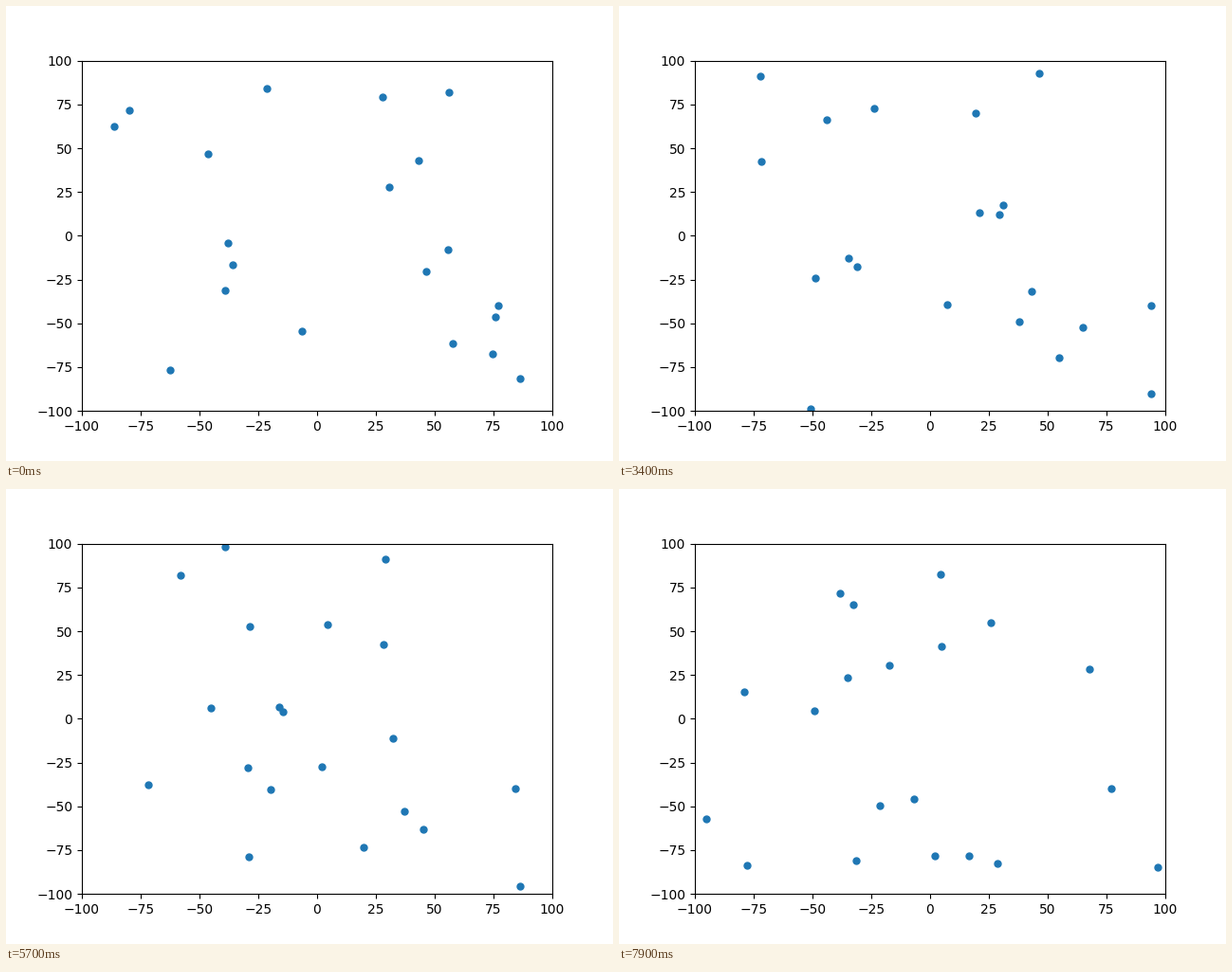
Recreate the animation shown at these times as a matplotlib script. Size 640 px wide and 480 px high, loop 8000 ms.

```python
from itertools import combinations

import numpy as np
import matplotlib.pyplot as plt
from matplotlib.animation import FuncAnimation

FRAMES, INTERVAL = 80, 100      # ms per frame
SUBSTEPS = 10
WALL = 100
CONTACT = 2.95                  # distance at which two balls collide
CENTER = np.array([328, 242.4])         # stage pixel of the data origin
SCALE = np.array([2.48, -1.848])        # stage pixels per data unit

# Every ball starts at rest: start x, y (px), constant pull x, y (px/s^2)
BALLS = np.array([
    (114, 127, 6.3, 6.4), (130, 110, 3.3, -6.3),
    (275, 87, -1.1, 3.6), (397, 96, -3.6, 2.9),
    (467, 91, -4.1, -3.4), (213, 156, 1.1, -6.3),
    (435, 163, -9.6, 9.5), (404, 191, 0.2, 4.2),
    (234, 250, 1.3, 2.7), (239, 273, -5.5, 2.4),
    (231, 300, 3.5, -4.3), (466, 257, -11.3, -7.2),
    (443, 280, -1.4, 3.7), (519, 316, 7.3, 0),
    (516, 328, -4.7, 1.9), (471, 356, -8.5, -3.9),
    (513, 367, -8.4, 0.7), (542, 393, 9.1, 2.7),
    (312, 343, 5.9, -4.9), (173, 384, 5.1, 7.8),
])
PAIRS = np.array(list(combinations(range(len(BALLS)), 2)))


def collide(pos, vel):
    """Equal balls that meet swap their speed along the line between them."""
    a, b = PAIRS.T
    gaps = np.hypot(*(pos[b] - pos[a]).T)
    for i, j in PAIRS[gaps < CONTACT]:
        normal = pos[j] - pos[i]
        normal /= np.hypot(*normal)
        closing = (vel[j] - vel[i]) @ normal
        if closing < 0:
            vel[i] += closing * normal
            vel[j] -= closing * normal


def simulate():
    """Positions of all balls for every frame of the loop."""
    pos = (BALLS[:, :2] - CENTER) / SCALE
    acc = BALLS[:, 2:] / SCALE
    vel = np.zeros_like(pos)
    dt = INTERVAL / 1000 / SUBSTEPS
    track = []
    for _ in range(FRAMES):
        track.append(pos)
        for _ in range(SUBSTEPS):
            collide(pos, vel)
            pos = pos + vel * dt + acc * dt * dt / 2
            vel = vel + acc * dt
            vel = np.where(abs(pos) > WALL, -vel, vel)
            pos = 2 * np.clip(pos, -WALL, WALL) - pos
    return track


track = simulate()

fig, ax = plt.subplots(figsize=(6.4, 4.8), dpi=100)
ax.set(xlim=(-WALL, WALL), ylim=(-WALL, WALL))
dots, = ax.plot([], [], "o", color="#1f77b4", markersize=5)


def update(frame):
    dots.set_data(*track[frame].T)
    return dots,


anim = FuncAnimation(fig, update, frames=FRAMES, interval=INTERVAL,
                     repeat=True, repeat_delay=0)
plt.show()
```
